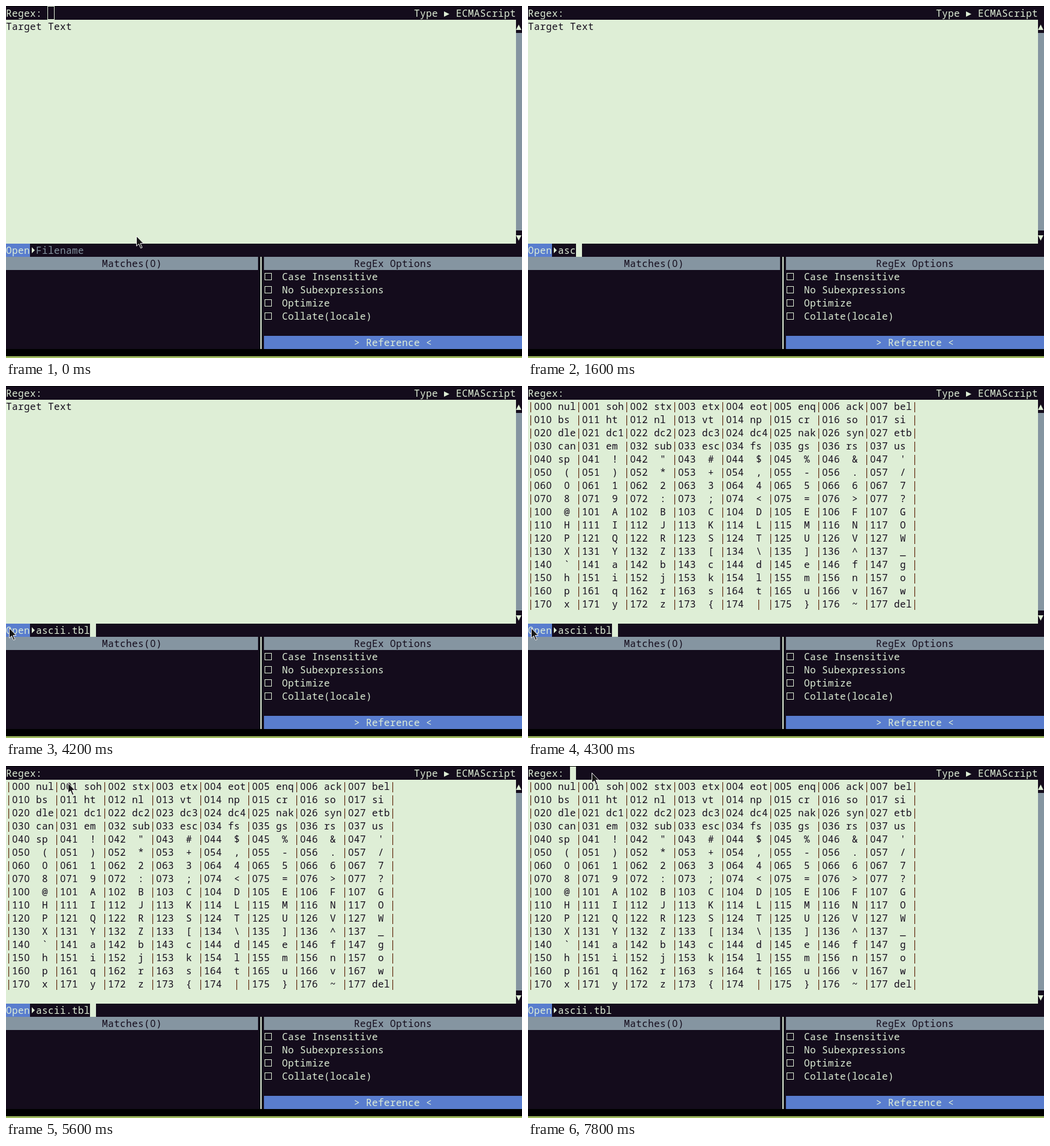
An HTML page with a canvas that plays this animation: 860 by 588 pixels, repeating every 8 s.

```html
<!DOCTYPE html>
<html lang="en">
<head>
<meta charset="utf-8">
<title>Regex tester</title>
<style>
html, body { margin: 0; width: 860px; height: 588px; overflow: hidden; background: #000; }
canvas { display: block; }
</style>
</head>
<body>
<canvas id="stage" width="860" height="588"></canvas>
<script>
const ctx = document.getElementById('stage').getContext('2d', { alpha: false });
const DARK = '#140c1c', LIGHT = '#deeed6', GREY = '#8595a1', BLUE = '#597dce', BAR = '#5c2408';
const CW = 10, RH = 22, LOOP = 8000;
const MONO = '16px "Noto Sans Mono", "DejaVu Sans Mono", monospace';
const ZERO = '16px "Noto Sans", "Open Sans", sans-serif'; // zero without a slash

const fileName = 'ascii.tbl';
const loadTime = 4300;
const controls = ('nul soh stx etx eot enq ack bel bs ht nl vt np cr so si dle dc1 dc2 dc3 dc4 ' +
  'nak syn etb can em sub esc fs gs rs us sp').split(' ');
const label = code => code < 33 ? controls[code].padEnd(3)
  : code === 127 ? 'del' : ` ${String.fromCharCode(code)} `;
const table = Array.from({ length: 16 }, (_, row) =>
  Array.from({ length: 8 }, (_, i) => {
    const code = row * 8 + i;
    return `|${code.toString(8).padStart(3, '0')} ${label(code)}`;
  }).join('') + '|');

// Pointer moves; bend is the sideways bulge of the path
const home = { x: 217, y: 384 };
const moves = [
  { from: 0, to: 300, x: 204, y: 396 },
  { from: 400, to: 900, x: 201, y: 402 },
  { from: 3300, to: 4000, x: 5, y: 404, bend: -16 },
  { from: 4700, to: 4900, x: 180, y: 184 },
  { from: 4900, to: 5600, x: 103, y: 28, bend: 70 },
  { from: 5600, to: 5800, x: 106, y: 11 }
];

function pointerAt(t) {
  let { x, y } = home;
  for (const move of moves) {
    const k = Math.min(Math.max((t - move.from) / (move.to - move.from), 0), 1);
    const dx = move.x - x, dy = move.y - y;
    const bulge = (move.bend || 0) * Math.sin(Math.PI * k) / Math.hypot(dx, dy);
    x += dx * k - dy * bulge;
    y += dy * k + dx * bulge;
    if (k < 1) break;
  }
  return [Math.round(x), Math.round(y)];
}

function rect(color, col, row, cols, rows = 1) {
  ctx.fillStyle = color;
  ctx.fillRect(col * CW, 1 + row * RH, cols * CW, rows * RH);
}

function print(text, col, row, color = LIGHT) {
  [...text].forEach((ch, i) => {
    const bar = ch === '|';
    ctx.font = ch === '0' ? ZERO : MONO;
    ctx.fillStyle = bar ? BAR : color;
    ctx.fillText(ch, (col + i) * CW + (bar ? 4.5 : 4.8), row * RH + 18);
  });
}

function polygon(color, ...points) {
  ctx.beginPath();
  points.forEach(([x, y]) => ctx.lineTo(x, y));
  ctx.closePath();
  ctx.fillStyle = color;
  ctx.fill();
}

function drawWindow() {
  rect(DARK, 0, 0, 86, 26);
  print('Regex:', 0, 0);
  print('Type', 68, 0);
  polygon(LIGHT, [730, 9], [739, 13.5], [730, 18]);
  print('ECMAScript', 75, 0);

  rect(LIGHT, 0, 1, 85, 17);
  rect(GREY, 85, 2, 1, 15);
  polygon(LIGHT, [850, 40], [854.5, 31], [859, 40]);
  polygon(LIGHT, [850, 383], [854.5, 392], [859, 383]);

  rect(BLUE, 0, 18, 4);
  print('Open', 0, 18);
  polygon(LIGHT, [43, 403], [48, 408], [43, 413]);

  rect(GREY, 0, 19, 42);
  rect(GREY, 43, 19, 43);
  ctx.fillStyle = LIGHT;
  ctx.fillRect(424, 419, 2, 154);
  print('Matches(0)', 16, 19, DARK);
  print('RegEx Options', 58, 19, DARK);
  ctx.strokeStyle = LIGHT;
  ['Case Insensitive', 'No Subexpressions', 'Optimize', 'Collate(locale)'].forEach((option, i) => {
    ctx.strokeRect(431.5, 446.5 + i * RH, 11, 11);
    print(option, 46, 20 + i);
  });
  rect(BLUE, 43, 25, 43);
  print('> Reference <', 58, 25);

  ctx.fillStyle = '#9db85c';
  ctx.fillRect(0, 585, 860, 3);
}

function drawCaret(t, typed) {
  const blinkOn = t < 4600 || Math.floor((t - 4600) / 600) % 2 === 1;
  if (t < 300) {
    ctx.strokeStyle = LIGHT;
    ctx.strokeRect(69.5, .5, 11, 22);
  } else if (blinkOn) {
    const inFile = t >= 600 && t < 5800;
    rect(LIGHT, inFile ? 5 + typed : 7, inFile ? 18 : 0, 1);
  }
}

function drawPointer(t) {
  if (t >= 1100 && t < 3300) return; // hidden while typing
  ctx.save();
  ctx.translate(...pointerAt(t));
  polygon('#181818', [.5, .5], [.5, 17], [4.5, 13.5], [7.5, 20.5], [10, 19.5], [7, 12.5], [12, 12.5]);
  ctx.strokeStyle = '#f4f4f4';
  ctx.stroke();
  ctx.restore();
}

function draw(t) {
  ctx.fillStyle = '#000';
  ctx.fillRect(0, 0, 860, 588);
  drawWindow();
  if (t < loadTime) print('Target Text', 0, 1, DARK);
  else table.forEach((line, i) => print(line, 0, 1 + i, DARK));

  const keys = Math.floor((t - 1060) / 225) + 1;
  const typed = Math.min(Math.max(keys, 0), fileName.length);
  if (t < 600) print('Filename', 5, 18, GREY);
  else print(fileName.slice(0, typed), 5, 18);
  drawCaret(t, typed);
  drawPointer(t);
}

ctx.textAlign = 'center';
ctx.lineWidth = 1;
const start = performance.now();
function tick() {
  // The screen refreshes every 100 ms
  draw(Math.floor((performance.now() - start) % LOOP / 100) * 100);
  requestAnimationFrame(tick);
}
tick();
</script>
</body>
</html>
```
